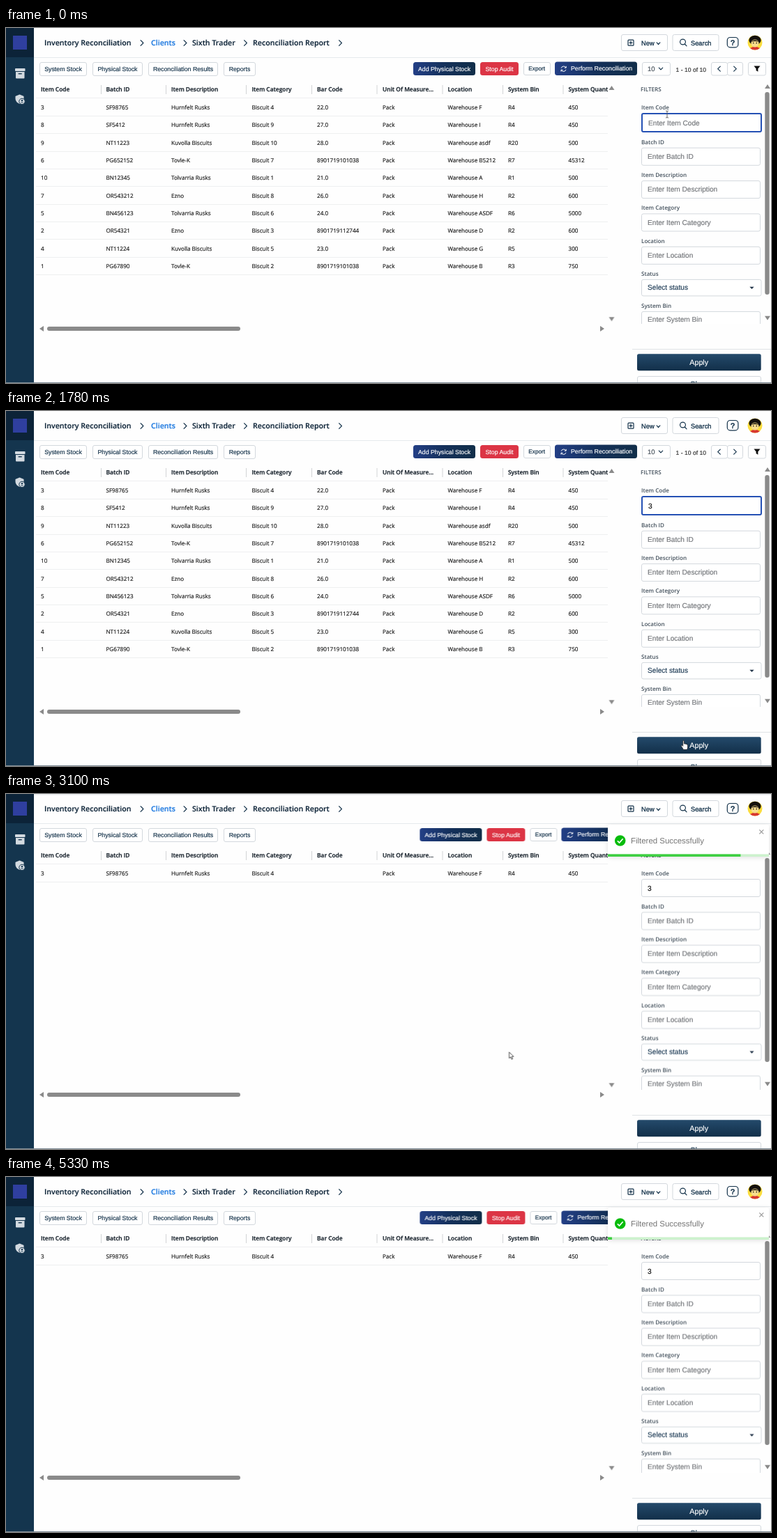
Animation of 1097x510 px, one loop 5470 ms. Source, as an HTML page:

```html
<!DOCTYPE html>
<html lang="en">
<head>
<meta charset="utf-8">
<title>Inventory Reconciliation</title>
<style>
html, body { margin: 0; width: 100%; height: 100%; overflow: hidden; background: #fefefe; }
svg { display: block; width: 100vw; height: 100vh; overflow: hidden; }
text { font-family: "Liberation Sans", Arial, sans-serif; font-size: 8.77px; color: #14324a; fill: currentColor; stroke: currentColor; stroke-width: .18; text-rendering: geometricPrecision; white-space: pre; }
.crumb, .th, .td, .label { font-family: "Open Sans", "Noto Sans", sans-serif; }
.crumb { font-size: 10.65px; font-weight: 600; color: #12283c; }
.link { color: #1f7ae0; }
.th { font-size: 8.4px; font-weight: 600; color: #16202a; stroke-width: .25; }
.td { font-size: 8.1px; color: #1c1c1c; }
.label { font-size: 8.1px; font-weight: 600; color: #43505c; stroke: none; }
.head { font-size: 9.3px; stroke-width: .3; }
.small { font-size: 8.2px; }
.page { font-size: 8.6px; color: #333; }
.ten { font-size: 9.5px; color: #444f59; }
.field { font-size: 10.15px; color: #74777b; }
.dark { color: #24405a; }
.black { color: #111; }
.white { color: #fff; }
.action { font-size: 10.7px; }
.note { font-size: 11.45px; color: #757575; stroke: none; }
.mid { text-anchor: middle; }
.end { text-anchor: end; }
.box { fill: #fff; stroke: #d3d8dd; }
.line { fill: none; stroke: #14324a; stroke-width: 1.2; stroke-linecap: round; stroke-linejoin: round; }
.grey { fill: #8a8a8a; }
.ring { fill: #fff; stroke: #2450b4; stroke-width: 2; }

.cut { animation: 5470ms step-end infinite; }
.hint { animation-name: untilTyped; }
.typed { animation-name: sinceTyped; }
.focused { animation-name: untilBlur; }
.blurred { animation-name: sinceBlur; }
.lower { animation-name: settle; }
.nudge { animation-name: nudge; }
.thumb { animation-name: thumb; }
.all { animation-name: untilFilter; }
.one { animation-name: sinceFilter; }
.tools { animation-name: tools; }
.beam { animation-name: beam; }
.arrow { animation-name: arrow; }
.hand { animation-name: hand; }
.toast { animation: toast 5470ms cubic-bezier(.215, .61, .355, 1) infinite; }
.left { transform-box: fill-box; transform-origin: 0 0; animation: left 5470ms linear infinite; }
.loader { transform-origin: 0 0; animation: loader 5470ms linear infinite; }
.cursor { animation: cursor 5470ms linear infinite; }

@keyframes untilTyped { 0% { opacity: 1 } 4.936%, 100% { opacity: 0 } }
@keyframes sinceTyped { 0% { opacity: 0 } 4.936%, 100% { opacity: 1 } }
@keyframes untilBlur { 0% { opacity: 1 } 34.552%, 100% { opacity: 0 } }
@keyframes sinceBlur { 0% { opacity: 0 } 34.552%, 100% { opacity: 1 } }
@keyframes settle { 0% { transform: translateY(2.4px) } 34.552%, 100% { transform: none } }
@keyframes nudge { 0% { transform: translate(1px, 1px) } 34.552%, 100% { transform: none } }
@keyframes thumb { 0% { height: 291px } 34.552%, 100% { height: 293px } }
@keyframes untilFilter { 0% { opacity: 1 } 39.305%, 100% { opacity: 0 } }
@keyframes sinceFilter { 0% { opacity: 0 } 39.305%, 100% { opacity: 1 } }
@keyframes tools { 0% { transform: none } 39.305%, 100% { transform: translateX(9.4px) } }
@keyframes toast {
  0%, 39.305% { transform: translateX(2160px); opacity: 0 }
  44.79% { transform: translateX(-18px); opacity: 1 }
  46.161% { transform: translateX(7.2px) }
  47.532% { transform: translateX(-3.5px) }
  48.446%, 100% { transform: none; opacity: 1 }
}
@keyframes left { 0%, 47.715% { transform: none } 98.775%, 100% { transform: scaleX(0) } }
@keyframes loader {
  0%, 42.05% { transform: scaleX(0); opacity: 1 }
  47.532% { transform: scaleX(.732) }
  50.3% { transform: none; opacity: 1 }
  53% { opacity: 1 }
  57%, 100% { transform: none; opacity: 0 }
}
@keyframes cursor {
  0% { transform: translate(948px, 124px); animation-timing-function: step-end }
  14.26% { transform: translate(948px, 126px) }
  18.28% { transform: translate(958px, 270px) }
  23.95% { transform: translate(972px, 440px) }
  26.14%, 50.09% { transform: translate(973px, 480px) }
  53.93% { transform: translate(800px, 425px) }
  57.59% { transform: translate(700px, 360px) }
  60.15% { transform: translate(600px, 310px); animation-timing-function: ease-out }
  63.62% { transform: translate(401px, 255px); animation-timing-function: ease-in-out }
  68.556%, 70.93% { transform: translate(727px, 347px); animation-timing-function: ease-in }
  75.5% { transform: translate(797px, 424px) }
  80.07%, 100% { transform: translate(880px, 495px) }
}
@keyframes beam {
  0%, 15.54%, 16.86%, 18.17%, 19.74%, 22.85% { opacity: 1 }
  14.94%, 16.27%, 17.59%, 19.01%, 20.62%, 23.46%, 100% { opacity: 0 }
}
@keyframes arrow {
  0%, 15.54%, 16.86%, 18.17%, 19.74%, 22.85%, 25.52%, 80.07%, 100% { opacity: 0 }
  14.94%, 16.27%, 17.59%, 19.01%, 20.62%, 23.46%, 50.88% { opacity: 1 }
}
@keyframes hand { 0%, 50.88%, 100% { opacity: 0 } 25.52% { opacity: 1 } }
</style>
</head>
<body>
<script>
const text = (x, y, s, cls = '') => `<text x="${x}" y="${y}" class="${cls}">${s}</text>`;
const rect = (x, y, w, h, attrs = '') => `<rect x="${x}" y="${y}" width="${w}" height="${h}" ${attrs}/>`;
const path = (d, attrs = 'class="line"') => `<path d="${d}" ${attrs}/>`;
const group = (cls, ...parts) => `<g class="${cls}">${parts.join('')}</g>`;
const cut = (name, ...parts) => group('cut ' + name, ...parts);
const fill = c => `fill="${c}"`;
const box = (x, y, w, h) => rect(x + .5, y + .5, w - 1, h - 1, 'rx="2.5" class="box"');
const chevron = (x, y, dx, dy) => dx
  ? path(`M${x - dx} ${y - dy}L${x + dx} ${y}L${x - dx} ${y + dy}`)
  : path(`M${x - dy * 1.4} ${y - dy / 2}L${x} ${y + dy}L${x + dy * 1.4} ${y - dy / 2}`);
const triangle = (x, y, turn) =>
  path('M-4 3L0 -3L4 3Z', `class="grey" transform="translate(${x} ${y}) rotate(${turn})"`);

function sidebar() {
  const pale = fill('#d3dae0');
  return rect(0, 0, 40, 510, fill('#14354e')) + rect(0, 0, 40, 42, fill('#0c2338')) +
    rect(10, 11, 20, 20, fill('#2f3f9f')) +
    rect(13, 58, 14.5, 4, 'rx=".8" fill="#d3dae0"') +
    path('M14 63H26.5V71.5Q26.5 72.5 25.5 72.5H15Q14 72.5 14 71.5Z', pale) +
    rect(17.7, 65, 5, 1.4, fill('#14354e')) +
    path('M19.5 95.5L25.5 98V102Q25 107 19.5 109Q14 107 13.5 102V98Z', pale) +
    '<circle cx="23" cy="105.5" r="4.2" fill="#d3dae0" stroke="#14354e"/>' +
    '<circle cx="23" cy="104.2" r="1.2" fill="#14354e"/>' +
    path('M20.7 107.6Q23 105.2 25.3 107.6Z', fill('#14354e'));
}

function header() {
  const avatar = '<circle cx="1074" cy="21" r="10.5" fill="#fbdc3c"/>' +
    path('M1067 29Q1074 24 1081 29Q1078 31.5 1074 31.5Q1070 31.5 1067 29Z', fill('#d8372f')) +
    '<ellipse cx="1074" cy="17.5" rx="8.6" ry="6.8" fill="#15110e"/>' +
    '<ellipse cx="1074" cy="22" rx="5.6" ry="5.6" fill="#f8dc8c"/>' +
    path('M1068.4 20Q1074 14.5 1079.6 20Q1074 18 1068.4 20Z', fill('#15110e')) +
    '<circle cx="1071.8" cy="21.6" r=".8"/><circle cx="1076.2" cy="21.6" r=".8"/>';
  return text(55, 25, 'Inventory Reconciliation', 'crumb') + text(208, 25, 'Clients', 'crumb link') +
    text(267, 25, 'Sixth Trader', 'crumb') + text(354, 25, 'Reconciliation Report', 'crumb') +
    [195, 257, 343.5, 479.5].map(x => chevron(x, 21.5, 1.9, 3.8)).join('') +
    box(882, 9, 67, 24) + rect(892, 17.2, 8, 8, 'rx="1" class="line"') +
    path('M894 21.2H898M896 19.2V23.2') + text(911, 24.7, 'New', 'head') + chevron(935.5, 21.8, 0, 1.7) +
    box(955.5, 9, 67, 24) + '<circle cx="970.5" cy="20" r="3.9" class="line"/>' + path('M973.4 23L976 25.8') +
    text(982, 24.7, 'Search', 'head') +
    rect(1034.3, 13.5, 15.6, 14.4, 'rx="4.2" class="line"') +
    text(1042.1, 24.5, '<tspan font-size="11" font-weight="700">?</tspan>', 'mid') + avatar +
    rect(40, 42, 1057, 1, fill('#e6eaed'));
}

function toolbar() {
  const tabs = [[48, 68, 'System Stock'], [124, 72, 'Physical Stock'], [204, 100, 'Reconciliation Results'], [312, 46, 'Reports']];
  const solid = (x, y, w, h, c) => rect(x, y, w, h, `rx="3.5" fill="${c}"`);
  return tabs.map(([x, w, s]) => box(x, 49, w, 20) + text(x + w / 2, 61.8, s, 'mid')).join('') +
    cut('tools',
      solid(584, 49, 89, 19, 'url(#navy)'), text(628.5, 61.8, 'Add Physical Stock', 'mid white'),
      solid(680, 49, 55, 19, '#dc3545'), text(707.5, 61.8, 'Stop Audit', 'mid white'),
      box(742, 49, 39, 19), text(761.2, 61.3, 'Export', 'mid small'),
      solid(787, 48.5, 118, 19.5, 'url(#navy)'),
      path('M796.2 57.6A3.7 3.7 0 0 1 803 57M803.2 54.8V57.2H800.8M803 59.8A3.7 3.7 0 0 1 796.2 60.4M796 62.6V60.2H798.4', 'fill="none" stroke="#fff"'),
      text(810, 61.4, 'Perform Reconciliation', 'white'),
      box(912, 49, 41, 19.5), text(920, 62, '10', 'ten'), chevron(939, 58, 0, 1.9)) +
    cut('all', text(1004, 62.8, '1 - 10 of 10', 'page end')) +
    cut('one', text(1004, 62.8, '1 - 1 of 1', 'page end')) +
    box(1011, 49, 24, 19.5) + box(1034, 49, 23, 19.5) +
    chevron(1022.5, 58.6, -1.8, 3.5) + chevron(1045.5, 58.6, 1.8, 3.5) +
    box(1064, 49, 26, 19.5) + path('M1072.5 54.5H1081.5L1078.4 58.5V62.8L1075.6 61V58.5Z', fill('#111'));
}

function table() {
  const cols = [50, 143.5, 237, 352.5, 446, 540, 633.5, 720, 806.5];
  const heads = 'Item Code,Batch ID,Item Description,Item Category,Bar Code,Unit Of Measure...,Location,System Bin,System Quantity'.split(',');
  // item code, batch, description, category, bar code, warehouse, bin, quantity
  const rows = `3|SF98765|Hurnfelt Rusks|4|22.0|F|4|450
8|SF5412|Hurnfelt Rusks|9|27.0|I|4|450
9|NT11223|Kuvolla Biscuits|10|28.0|asdf|20|500
6|PG652152|Tovle-K|7|8901719101038|B5212|7|45312
10|BN12345|Tolvarria Rusks|1|21.0|A|1|500
7|OR543212|Ezno|8|26.0|H|2|600
5|BN456123|Tolvarria Rusks|6|24.0|ASDF|6|5000
2|OR54321|Ezno|3|8901719112744|D|2|600
4|NT11224|Kuvolla Biscuits|5|23.0|G|5|300
1|PG67890|Tovle-K|2|8901719101038|B|3|750`.split('\n').map(r => r.split('|'));
  const rule = y => rect(43, y, 820, 1, fill('#eeeff0'));
  const row = ([code, batch, name, cat, bar, house, bin, qty], i) => {
    const y = 117 + i * 25.33;
    const cells = [code, batch, name, 'Biscuit ' + cat, bar, 'Pack', 'Warehouse ' + house, 'R' + bin, qty];
    const out = cells.map((s, c) => {
      const cell = text(cols[c], y.toFixed(2), s, 'td');
      return i === 0 && c === 4 ? cut('all', cell) : cell;
    }).join('') + rule(Math.round(126 + i * 25.33));
    return i ? cut('all', out) : out;
  };
  return `<g clip-path="url(#grid)">${heads.map((s, i) => text(cols[i], 91, s, 'th')).join('')}</g>` +
    [136, 229, 344, 438, 531.5, 625.5, 712, 798.5].map(x => rect(x, 82, 1, 13, fill('#d2d4d6'))).join('') +
    rule(100) + rows.map(row).join('') +
    triangle(868.5, 86, 0) + triangle(868.5, 418.3, 180) + triangle(51, 432, -90) + triangle(855, 432, 90) +
    rect(59, 429, 277, 6, 'rx="3" class="grey"');
}

function filters() {
  const input = (i, name) => {
    const y = 122 + i * 47.35;
    return text(911, y - 5, name, 'label') + box(911, y, 171, 26) + text(920, y + 16.1, 'Enter ' + name, 'field');
  };
  const names = ['Batch ID', 'Item Description', 'Item Category', 'Location'];
  const lower = cut('lower',
    names.map((s, i) => input(i + 1, s)).join(''),
    text(911, 353.2, 'Status', 'label'), box(911, 358.5, 172.5, 24.5),
    text(920, 374, 'Select status', 'field dark'), path('M1066.3 369.3H1072.7L1069.5 372.6Z', fill('#24364a')),
    text(911, 399.6, 'System Bin', 'label'), box(911, 404.5, 171, 26), text(920, 420.1, 'Enter System Bin', 'field'));
  return text(910, 91, 'FILTERS', 'label') + text(911, 117, 'Item Code', 'label') +
    cut('focused', rect(912, 123, 171, 26, 'rx="2" class="ring"')) +
    cut('blurred', box(911, 122, 171, 26)) +
    cut('hint', text(921, 139.6, 'Enter Item Code', 'field')) +
    cut('typed', cut('nudge', text(920, 138.5, '3', 'field black'))) +
    `<g clip-path="url(#form)">${lower}</g>` +
    triangle(1092, 84, 0) + triangle(1092, 416.8, 180) +
    rect(1088.3, 92, 6.4, 291, 'rx="3.2" class="grey cut thumb"') +
    rect(898, 461, 199, 1, fill('#dfe3e6')) +
    rect(905, 468.3, 177.7, 24, 'rx="2.5" fill="url(#deep)"') + text(993.7, 483.8, 'Apply', 'action mid white') +
    box(905, 500, 178, 24) + text(993.5, 515.3, 'Clear', 'action mid');
}

function toast() {
  return group('toast',
    rect(863, 44.5, 231, 45.5, 'rx="2.5" fill="#fff" filter="url(#shade)"'),
    '<circle cx="880.7" cy="67" r="7.8" fill="#07bc0c"/>',
    path('M876.8 67.3L879.6 70L884.6 64.3', 'fill="none" stroke="#fff" stroke-width="1.7"'),
    text(896, 71, 'Filtered Successfully', 'note'),
    path('M1080.3 51.3L1086.3 57.3M1086.3 51.3L1080.3 57.3', 'stroke="#9a9a9a" stroke-width="1.2"'),
    rect(863, 86.4, 231, 3.6, fill('#cdf2ce')),
    rect(863, 86.4, 231, 3.6, 'fill="#3fcf43" class="left"'));
}

function cursor() {
  const ink = 'fill="#fff" stroke="#222" stroke-width=".8" stroke-linejoin="round"';
  return group('cursor',
    cut('beam', path('M-2 -5Q0 -5 0 -4Q0 -5 2 -5M0 -4V4M-2 5Q0 5 0 4Q0 5 2 5', 'fill="none" stroke="#555" stroke-width=".9"')),
    cut('arrow', path('M-3 -5.2V3.6L-1 1.8L.5 5.2L2 4.5L.6 1.2H3.4Z', ink)),
    cut('hand', path('M-2.3 -6Q-1.3 -7 -.6 -6V-1.8Q.6 -2.6 1.2 -1.5Q2.4 -2.2 3 -1Q4.4 -1.4 4.6 0V3Q4.4 5 3.5 6.5H-1.5Q-3 4 -4.6 1.4Q-4.6 0 -3.4 .3L-2.3 1.4Z', ink)));
}

const defs = `<defs>
<linearGradient id="navy"><stop stop-color="#233f86"/><stop offset=".5" stop-color="#14305a"/><stop offset="1" stop-color="#112e49"/></linearGradient>
<linearGradient id="deep" x2="0" y2="1"><stop stop-color="#244a6b"/><stop offset="1" stop-color="#122f49"/></linearGradient>
<clipPath id="grid">${rect(40, 80, 823, 20)}</clipPath>
<clipPath id="form">${rect(900, 150, 186, 274.5)}</clipPath>
<filter id="shade" x="-10%" y="-50%" width="120%" height="200%"><feDropShadow dx="0" dy="1" stdDeviation="3" flood-opacity=".13"/></filter>
</defs>`;

document.body.innerHTML = `<svg viewBox="0 0 1097 510">${[
  defs, rect(0, 0, 1097, 510, fill('#fefefe')), header(), toolbar(), table(), filters(), sidebar(),
  rect(0, 0, 1097, 1.6, 'fill="#14324a" class="loader"'), toast(),
  rect(0, 509, 1097, 1, fill('#7f8c96')), cursor()
].join('')}</svg>`;
</script>
</body>
</html>
```
